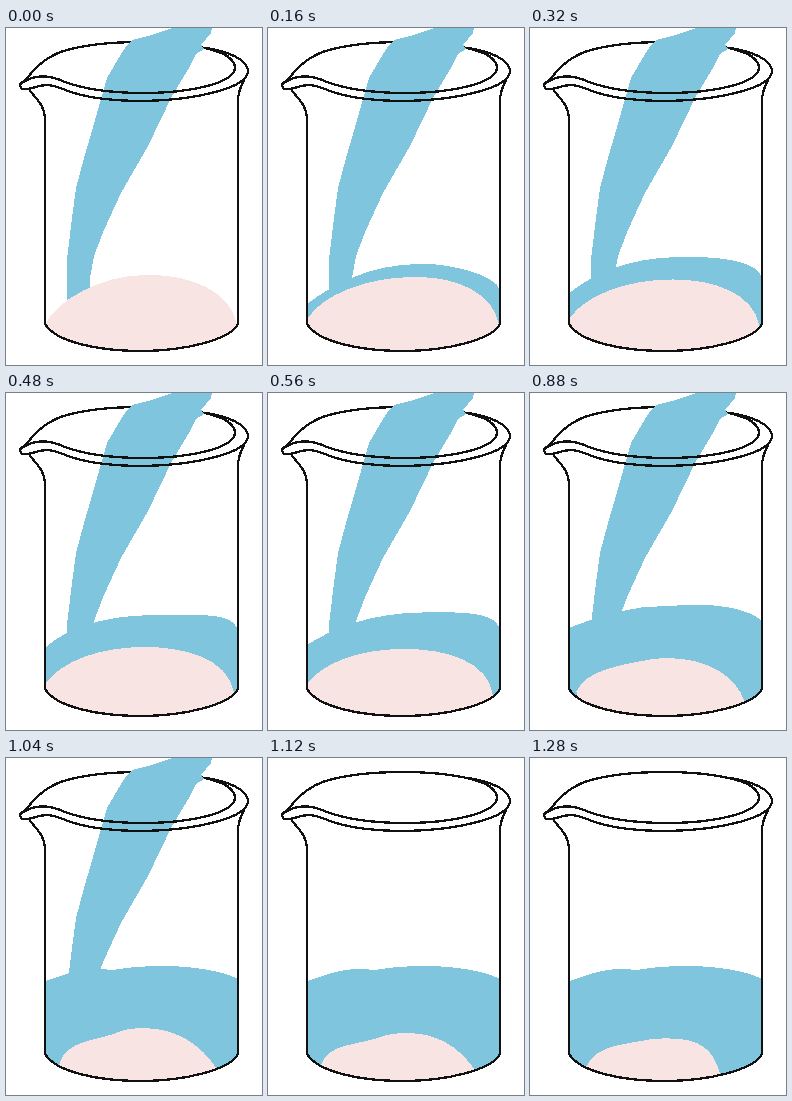
Write an HTML page without scripts that moves like this. It is 256 by 337 pixels and loops after 1.36 s.

```html
<!DOCTYPE html>
<html lang="en">
<head>
<meta charset="utf-8">
<title>Beaker filling</title>
<style>
  html, body { margin: 0; width: 100%; height: 100%; overflow: hidden; background: #fff; }
  svg { display: block; width: 100%; height: 100%; shape-rendering: crispEdges; }
  .blue { fill: #80c5de; }
  .pink { fill: #f8e4e2; }
  .line { fill: none; stroke: #111; stroke-width: 2.3; stroke-linecap: round; stroke-linejoin: round; }

  /* 17 poses of 80 ms: each span between key poses is stepped */
  #water, #mound, #stream { animation: 1360ms infinite; }
  #water { animation-name: rise; }
  #mound { animation-name: dissolve; }
  #stream { animation-name: pour; animation-timing-function: step-end; }

  @keyframes pour {
    0% { visibility: visible; }
    82.352%, 100% { visibility: hidden; }
  }

  @keyframes rise {
    0% {
      d: path("M40 297C52 274 95 249 140 249C182 248 224 264 231 298V330H40Z");
      animation-timing-function: steps(2);
    }
    11.764% {
      d: path("M40 275C64 258 100 236 152 236C182 235 228 247 232 262V330H40Z");
      animation-timing-function: steps(4);
    }
    35.294% {
      d: path("M40 254C58 238 92 222 150 222C210 221 228 222 232 238V330H40Z");
      animation-timing-function: steps(3);
    }
    52.941% {
      d: path("M40 246C76 232 122 214 176 214C204 214 228 220 232 235V330H40Z");
      animation-timing-function: steps(4);
    }
    76.47%, 100% {
      d: path("M40 223C74 210 88 210 106 212C150 204 206 208 232 221V330H40Z");
    }
  }

  @keyframes dissolve {
    0% {
      d: path("M40 295C52 272 95 247 140 247C182 246 224 262 231 296V330H40Z");
      animation-timing-function: steps(2);
    }
    11.764% {
      d: path("M40 290C53 268 98 249 145 249C190 248 226 266 231 297V330H40Z");
      animation-timing-function: steps(4);
    }
    35.294% {
      d: path("M40 290C55 269 92 254 138 254C176 254 222 264 228 300V330H40Z");
      animation-timing-function: steps(3);
    }
    52.941% {
      d: path("M40 290C52 274 88 260 128 260C176 258 218 275 219 308V330H40Z");
      animation-timing-function: steps(4);
    }
    76.47% {
      d: path("M53 307C60 280 92 284 118 272C160 264 192 282 211 311V330H53Z");
      animation-timing-function: steps(1);
    }
    82.352% {
      d: path("M53 307C60 284 92 288 118 277C158 270 186 282 207 312V330H53Z");
      animation-timing-function: steps(2);
    }
    94.117%, 100% {
      d: path("M56 309C66 287 92 287 122 281C166 278 182 286 191 318V330H56Z");
    }
  }
</style>
</head>
<body>
<svg viewBox="0 0 256 337">
  <clipPath id="inside">
    <path d="M40 80V296C50 314 92 323 135 323S224 312 232 296V80Z"/>
  </clipPath>

  <!-- back of the rim -->
  <path class="line" d="M18 54C28 41 38 30 56 23.500C80 16 106 14 135 14C168 14 203 18 222 28"/>

  <path id="stream" class="blue" d="M166 0H206L205 5L200 11L195 16L198 21L190 26L183 40L166 68L142 118L115 165L98 202L88 228L84 250V264L61 272L61.500 227L66 190L70 160L78 130L85 106L93 78L101 50L115 26L121 17L126 12L142 8Z"/>

  <g clip-path="url(#inside)">
    <path id="water" class="blue"/>
    <path id="mound" class="pink"/>
  </g>

  <g class="line">
    <!-- spout, inner and outer lip -->
    <path d="M200 20C219 24 229 32 229 40C228 55 185 65 138 65C108 65 78 61 59 54C46 48 35 46 23 51L15 55Q13 58 16 61C23 63 30 57 42 57C52 58 58 62 68 65C88 71 112 73 138 73C190 72 242 60 242 43C242 32 222 23 200 20"/>
    <!-- walls and base -->
    <path d="M23 61C28 69 39 77 39 90V296C50 314 92 323 135 323S224 312 232 296V74Q232 62 238 53"/>
  </g>
</svg>
</body>
</html>
```
